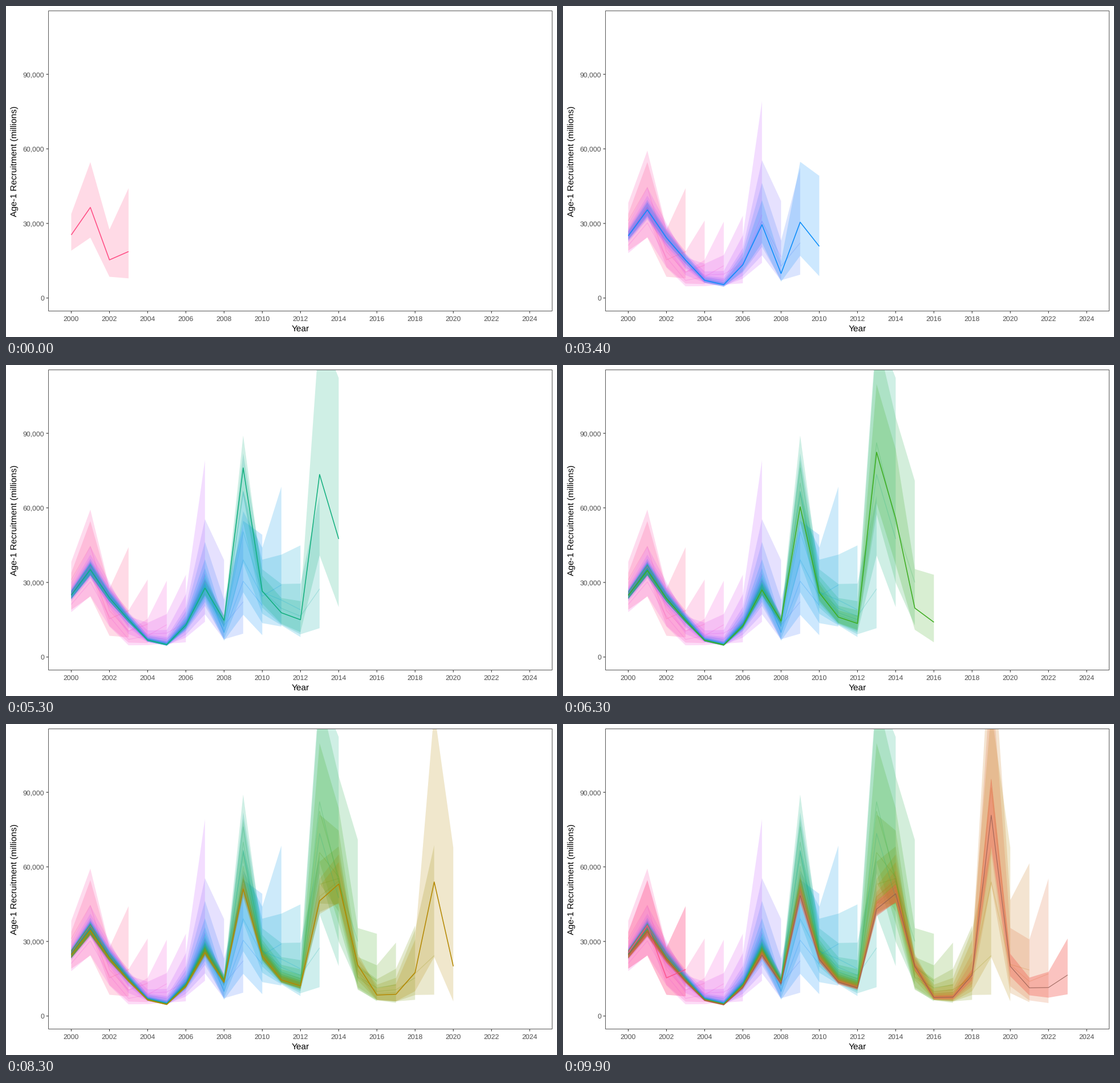
These frames come from a looping animation (966x580 px, 10 s). A matplotlib script:

```python
import matplotlib.pyplot as plt
import numpy as np
from matplotlib.animation import FuncAnimation
from matplotlib.patches import Polygon, Rectangle

plt.rcParams["text.hinting"] = "none"

W, H, DPI = 966, 580, 100
LEFT, TOP, RIGHT, BOTTOM = 74.5, 8.5, 957.5, 534.5
STEP = 100
FIRST, LAST = 2003, 2023

# Frames each assessment stays on show, then a short closing view
HOLDS = [4] + [5] * 9 + [4] + [5] * 6 + [4] * 4 + [1]
STARTS = np.cumsum([0] + HOLDS[:-1])

# Recruitment in thousands: settled value per year from 2000,
# and the first estimate made of each year from 2003
FINAL = [24.5, 34, 22.7, 14, 6.3, 4.5, 11.5, 24.5, 13, 48.5, 22.8, 13.6,
         11.3, 43, 49.2, 20, 7.4, 7.5, 16.5, 67, 20, 9, 6, 16.5]
NEW = [18.7, 13.2, 13, 14, 33.5, 16.5, 22.2, 20.8, 29, 19, 27.4,
       47.5, 30, 14, 12.5, 15.4, 24.3, 20, 18.5, 17, 16.5]

# Cohorts revised strongly: lag to full view, age of the swing, its size
REVISED = {
    2002: (1, 1.5, -0.42), 2003: (1, 1.5, -0.5), 2008: (1, 2.5, -0.4),
    2009: (4.5, 5, 0.35), 2013: (1, 2.4, 0.7), 2015: (1, 2.5, -0.35),
    2019: (2.2, 2.5, 0.4),
}

HUES = {
    2003: "#ff4a82", 2005: "#f650d7", 2007: "#c458ff", 2010: "#088cfa",
    2012: "#05a8d2", 2014: "#10af7d", 2016: "#3cac1e", 2020: "#b48700",
    2023: "#f55a50",
}


def px(year):
    return 114.4 + 33.49 * (np.asarray(year) - 2000)


def py(value):
    return 511.7 - 4.356 * np.asarray(value)


def color(year):
    keys = list(HUES)
    rgb = np.array([plt.matplotlib.colors.to_rgb(h) for h in HUES.values()])
    return tuple(np.interp(year, keys, channel) for channel in rgb.T)


def estimate(year, term):
    """Value for a year as seen by the assessment of the given term."""
    age, n = term - year, term - FIRST
    first = NEW[year - FIRST] if year >= FIRST else None
    if age == 0:
        return first
    base = FINAL[year - 2000] * (1 + 0.0018 * (year - 1999) * (LAST - term))
    start, bump = np.exp(-0.7 * age), 0
    if year in REVISED:
        lag, peak, size = REVISED[year]
        start = max(0, 1 - age / lag)
        bump = size * np.exp(-((age - peak) / 1.3) ** 2 / 2)
    if first is None:
        first = base
    value = base + (first - base) * start + base * bump * (1 - start)
    return value * (1 + 0.55 * np.sin(2.3 * n) * np.exp(-0.6 * n))


def assessment(term):
    years = np.arange(2000, term + 1)
    est = np.array([estimate(y, term) for y in years])
    width = np.interp(term, [2018, 2020, 2022, 2023], [1, 1.45, 1.4, 0.72])
    ratio = np.exp(0.06 + 0.8 * width * np.exp(-0.42 * (term - years)))
    return px(years), est, est / ratio, est * ratio


fig = plt.figure(figsize=(W / DPI, H / DPI), dpi=DPI, facecolor="white")
ax = fig.add_axes([0, 0, 1, 1])
ax.set_xlim(0, W)
ax.set_ylim(H, 0)
ax.axis("off")
panel = Rectangle((LEFT, TOP), RIGHT - LEFT, BOTTOM - TOP, fill=False,
                  ec="#5c5c5c", lw=0.75, zorder=9, snap=False)
ax.add_patch(panel)


def ribbon(x, lo, hi, c, z):
    pts = np.r_[np.c_[x, py(hi)], np.c_[x, py(lo)][::-1]]
    patch = Polygon(pts, fc=c, ec="none", lw=0, alpha=0.2, zorder=z)
    ax.add_patch(patch)
    patch.set_clip_path(panel)
    return patch


def line(x, est, c, lw, alpha, z):
    artist, = ax.plot(x, py(est), color=c, lw=lw, alpha=alpha, zorder=z,
                      solid_joinstyle="round", solid_capstyle="butt")
    artist.set_clip_path(panel)
    return artist


def tick(xs, ys):
    ax.plot(xs, ys, color="#333333", lw=0.8, snap=False,
            solid_capstyle="butt")


def label(x, y, s, size, c, **kw):
    ax.text(x, y, s, fontsize=size * 72 / DPI, color=c, va="baseline",
            family="Liberation Sans", rotation_mode="anchor", **kw)


def draw_axes():
    for year in range(2000, 2025, 2):
        x = px(year)
        tick([x, x], [BOTTOM, BOTTOM + 4])
        label(x, 552.2, str(year), 12.3, "#4d4d4d", ha="center")
    for value in range(0, 91, 30):
        y = py(value)
        tick([LEFT - 4, LEFT], [y, y])
        label(67.3, y + 4.4, f"{value * 1000:,}", 12.3, "#4d4d4d", ha="right")
    label(516, 569.5, "Year", 15.4, "black", ha="center")
    label(19.2, 272, "Age-1 Recruitment (millions)", 15.4, "black",
          ha="center", rotation=90)


draw_axes()
ribbons, faint, bold = [], [], []
for i, term in enumerate(range(FIRST, LAST + 1)):
    x, est, lo, hi = assessment(term)
    c = color(term)
    ribbons.append([ribbon(x, lo, hi, c, 2 + i / 100)])
    faint.append(line(x, est, c, 0.9, 0.22, 4 + i / 100))
    bold.append(line(x, est, c, 1.1, 1, 5))
    if term == FIRST:
        again = ribbon(x, lo, hi, c, 3)
    if term == LAST:
        ribbons[-1].append(ribbon(x, lo, hi, c, 3))
        trace = line(x, est, "#7d5a50", 0.75, 0.75, 5)


def update(frame):
    now = np.searchsorted(STARTS, frame, side="right") - 1
    closing = now == len(bold)
    for i in range(len(bold)):
        for patch in ribbons[i]:
            patch.set_visible(i <= now)
        faint[i].set_visible(i < now)
        bold[i].set_visible(i == now)
    again.set_visible(closing)
    trace.set_visible(closing)
    if closing:
        bold[0].set_visible(True)
    bold[0].set_alpha(0.75 if closing else 1)
    return []


anim = FuncAnimation(fig, update, frames=sum(HOLDS), interval=STEP,
                     repeat=True, repeat_delay=0, blit=False)
plt.show()
```
